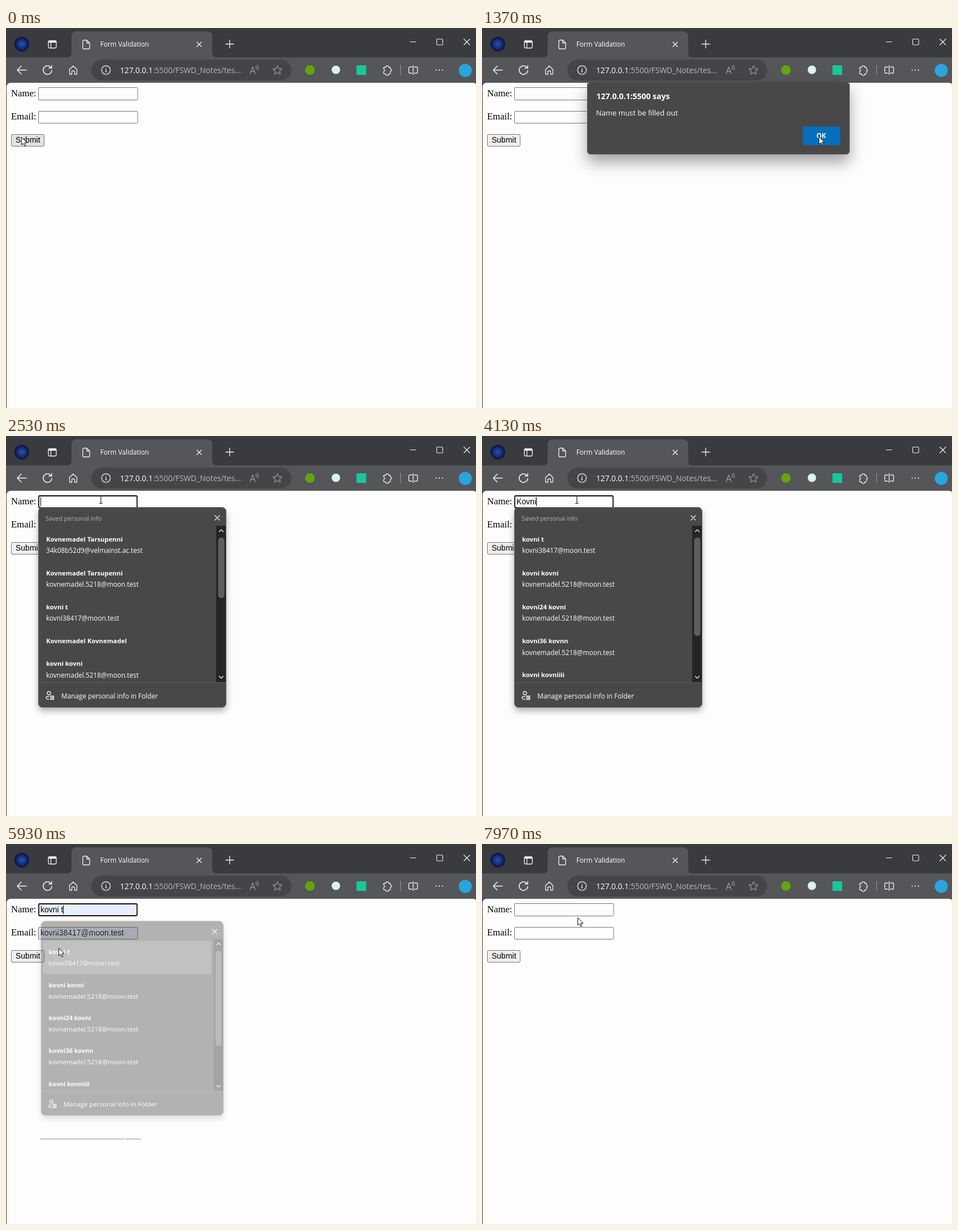
An HTML page for the animation above (8 s loop, 832x673 px).

```html
<!DOCTYPE html>
<html lang="en">
<head>
<meta charset="utf-8">
<title>Form Validation</title>
<style>
  html, body { margin: 0; width: 100%; height: 100%; overflow: hidden; background: #fdfdfb; }
  svg { display: block; width: 100%; height: 100%; }
  text { white-space: pre; }
  .ui { font-family: "Open Sans", "Noto Sans", sans-serif; fill: #fff; }
  .page { font: 16.7px "Liberation Serif", serif; fill: #000; }
  .field { font: 14px "Liberation Sans", sans-serif; fill: #000; }
  .bold { font-weight: 700; }
  .line { fill: none; stroke: #f2f2f2; stroke-width: 1.3; stroke-linecap: round; stroke-linejoin: round; }
  .dim { stroke: #96979a; }
  #dialog { filter: drop-shadow(0 14px 13px rgba(20, 10, 40, .38)); }
  #popup { filter: drop-shadow(0 6px 6px rgba(0, 0, 0, .3)); }
</style>
</head>
<body>
<svg viewBox="0 0 832 673">
  <defs>
    <radialGradient id="portrait">
      <stop offset="0" stop-color="#2858b0"/>
      <stop offset=".6" stop-color="#172c78"/>
      <stop offset="1" stop-color="#0c1238"/>
    </radialGradient>
  </defs>

  <!-- Browser frame -->
  <rect width="832" height="673" fill="#393b3e"/>
  <rect y="52" width="832" height="60" fill="#54565a"/>
  <path d="M108 52q8 0 8-8V15q0-9 9-9H356q9 0 9 9V44q0 8 8 8Z" fill="#54565a"/>
  <path d="M1 673V105q0-8 8-8H826q8 0 8 8V673Z" fill="#fdfdfb"/>
  <circle cx="28" cy="28.5" r="13" fill="url(#portrait)"/>
  <rect x="151" y="56" width="354" height="37" rx="18.5" fill="#434548"/>

  <g class="line">
    <rect x="75" y="22.5" width="14" height="13" rx="2.5"/>
    <path d="M75 24.5H89" stroke-width="3" stroke-linecap="butt"/><path d="M79.5 26V35"/>
    <path d="M143 21.5H138q-2 0-2 2V35q0 2 2 2H146q2 0 2-2V26.5ZM143 21.5V26.5H148"/>
    <path d="M338 25l8 8m0-8l-8 8M389 28.5h14M396 21.5v14"/>
    <path d="M715.5 24.5h10M810.5 19.5l10.5 10.5m0-10.5l-10.5 10.5" stroke-width="1.1"/>
    <rect x="762.5" y="19.5" width="10.5" height="10.5" rx="1.5" stroke-width="1.1"/>
    <path d="M36 74.5H20.5M27 67.5l-7 7 7 7" stroke-width="1.5"/>
    <path d="M79.5 70A7.6 7.6 0 1 0 81 75M80.8 66.5V71H76" stroke-width="1.5"/>
    <path d="M112.5 73.5L119 67.2l6.5 6.3V81q0 1-1 1H121.5V77q0-1-1-1h-3q-1 0-1 1v5H113.5q-1 0-1-1Z"/>
    <circle cx="177" cy="74.5" r="7.7"/><path d="M177 74V78M177 71v.1" stroke-width="1.6"/>
    <path d="M670 69.5h2.2a2.6 2.6 0 0 1 5.2 0H679q1.500 0 1.500 1.500V72.400a2.500 2.500 0 0 1 0 4.800V80q0 1.500-1.500 1.500H677.400a2.600 2.600 0 0 1-5.200 0H670q-1.500 0-1.500-1.500V77.200a2.500 2.500 0 0 0 0-4.800V71q0-1.500 1.500-1.500Z"/>
    <path d="M698.5 66V83" class="dim" stroke-width="1"/>
    <path d="M718.5 69H715q-2 0-2 2V78q0 2 2 2H718.5M723 69H726.5q2 0 2 2V78q0 2-2 2H723M720.7 66.5V82.5"/>
    <path d="M761.5 74.5h.1M767 74.5h.1M772.5 74.5h.1" stroke-width="2.2"/>
    <path class="dim" d="M480.5 66.8l2.4 5 5.5.7-4 3.8 1 5.5-4.9-2.7-4.9 2.7 1-5.5-4-3.8 5.5-.7Z"/>
    <path class="dim" d="M432 81l4.6-12 4.6 12M433.5 77h6.2M442 68q2 2 1.2 5M444.5 66q3 3 1.8 8"/>
  </g>
  <circle cx="538" cy="74.5" r="8.5" fill="#64a40e"/>
  <circle cx="584" cy="74" r="7.5" fill="#d9f2f3"/>
  <rect x="620.5" y="66" width="17" height="17" fill="#18c79c"/>
  <circle cx="813" cy="75" r="11.5" fill="#2aa4df"/>
  <text class="ui" x="167" y="33" font-size="11.7">Form Validation</text>
  <text class="ui" x="202" y="79.5" font-size="13.7">127.0.0.1<tspan fill="#b7b8ba">:5500/FSWD_Notes/tes...</tspan></text>

  <!-- Form -->
  <g class="page"><text x="9" y="120.5">Name:</text><text x="9" y="162">Email:</text></g>
  <rect id="nameBox"/>
  <rect id="emailBox" x="57.5" y="147.5" width="175.5" height="21" rx="1.5" stroke="#767676"/>
  <rect id="submit" x="9.5" y="188.5" width="58" height="21" rx="2.5" stroke="#767676"/>
  <g class="field">
    <text id="nameText" x="61" y="121"></text>
    <text id="emailText" x="61" y="162"></text>
    <text x="17" y="203">Submit</text>
  </g>
  <path id="caret" stroke="#000"/>
  <path id="remnant" d="M61 522.5H209M211 522.5H239" stroke="#c0c0c0" stroke-width="2"/>

  <g id="popup" class="ui">
    <rect x="57" y="126" width="333" height="355" rx="8" fill="#484848"/>
    <rect x="57.5" y="126.5" width="332" height="354" rx="8" fill="none" stroke="#606060"/>
    <text x="70" y="149.5" font-size="10.8" fill="#b4b4b4">Saved personal info</text>
    <path class="line" d="M370 141l8 8m0-8l-8 8"/>
    <rect id="hover" x="61" y="162" width="307" height="61" rx="3" fill="#6c6c6c"/>
    <g id="allRows"></g>
    <g id="matchRows"></g>
    <rect x="372" y="159" width="17" height="277" fill="#252525"/>
    <rect id="thumb" x="375.5" y="180" width="11" rx="5" fill="#5e5e5e"/>
    <path class="line" d="M377.5 169.5l3.5-3.5 3.5 3.5M377.5 425.5l3.5 3.5 3.5-3.5"/>
    <path d="M58 436.5H389" stroke="#5c5c5c"/>
    <g class="line">
      <circle cx="76" cy="455.5" r="3"/>
      <path d="M76 461.5H73q-2 0-2 2 1 3 5 3M79 460.5h5.5v6H79ZM81 462.5h2M81 464.5h2"/>
    </g>
    <text x="98" y="464.5" font-size="11.8">Manage personal info in Folder</text>
  </g>

  <g id="dialog" class="ui">
    <rect x="186" y="96" width="465" height="128" rx="7" fill="#484848"/>
    <path d="M186.5 97V217q0 6.5 6.5 6.5H644q6.5 0 6.5-6.5V97" fill="none" stroke="#626262"/>
    <text class="bold" x="202.5" y="125.5" font-size="14">127.0.0.1:5500 says</text>
    <text x="202" y="154.5" font-size="12.9">Name must be filled out</text>
    <rect x="568" y="174.5" width="66" height="33" rx="3" fill="#086fbd"/>
    <text class="bold" x="600.5" y="195" font-size="11.6" text-anchor="middle">OK</text>
  </g>

  <path id="arrow" d="M.5.5V14L3.7 11 5.8 16 8 15 5.9 10.3H10.2Z" fill="#fff" stroke="#111"/>
  <path id="beam" d="M-3-7.5h2l1 1 1-1h2M-3 6.5h2l1-1 1 1h2M0-6.5V5.5" fill="none" stroke="#222" stroke-width="1.2"/>
</svg>
<script>
const $ = id => document.getElementById(id);
const LOOP = 8000;
const LONG_MAIL = 'kovnemadel.5218@moon.test';
const SHORT_MAIL = 'kovni38417@moon.test';
const SHORT_NAME = 'kovni t';

const at = { opened: 100, closed: 1690, focus: 2500, list: 2515, hover: 5350, filled: 5830, hidden: 5860, sent: 7100 };
const typed = [[3350, 'K'], [3500, 'Ko'], [3650, 'Kov'], [3800, 'Kovn'], [3980, 'Kovni']];

// Pointer stops: time, x, y
const stops = [
  [0, 27, 193], [80, 27, 193], [470, 290, 225], [900, 596, 192], [1500, 596, 192],
  [1730, 365, 140], [2200, 168, 113], [4700, 168, 113], [5400, 93, 184], [5960, 93, 184],
  [6500, 30, 196], [7250, 30, 196], [7530, 58, 185], [7970, 169, 130], [8000, 169, 130]
];

function fillRows(id, people) {
  let y = 186.5;
  $(id).innerHTML = people.map(([name, mail]) => {
    const row = `<text class="bold" x="71" y="${y}" font-size="11.3">${name}</text>` +
      (mail ? `<text x="71" y="${y + 20.5}" font-size="11.8">${mail}</text>` : '');
    y += mail ? 60.2 : 40;
    return row;
  }).join('');
}
fillRows('allRows', [
  ['Kovnemadel Tarsupenni', '34k08b52d9@velmainst.ac.test'],
  ['Kovnemadel Tarsupenni', LONG_MAIL],
  [SHORT_NAME, SHORT_MAIL],
  ['Kovnemadel Kovnemadel'],
  ['kovni kovni', LONG_MAIL]
]);
fillRows('matchRows', [
  [SHORT_NAME, SHORT_MAIL],
  ['kovni kovni', LONG_MAIL],
  ['kovni24 kovni', LONG_MAIL],
  ['kovni36 kovnn', LONG_MAIL],
  ['kovni kovniiii']
]);

const clamp = v => Math.max(0, Math.min(1, v));
const progress = (t, start, length) => clamp((t - start) / length);
const within = (t, from, to) => t >= from && t < to;
const show = (id, on) => { $(id).style.display = on ? '' : 'none'; };
const set = (id, attrs) => { for (const key in attrs) $(id).setAttribute(key, attrs[key]); };
const scaleAbout = (x, y, s, dy = 0) => `translate(${x} ${y + dy}) scale(${s}) translate(${-x} ${-y})`;

function pointer(t) {
  const i = stops.findIndex(s => s[0] > t);
  const [t0, x0, y0] = stops[i - 1], [t1, x1, y1] = stops[i];
  const p = (t - t0) / (t1 - t0), e = p * p * (3 - 2 * p);
  return [x0 + (x1 - x0) * e, y0 + (y1 - y0) * e];
}

function drawForm(t, x, y) {
  const focused = within(t, at.focus, at.sent);
  const autofilled = within(t, at.hover, at.sent);
  const keys = typed.filter(([time]) => time <= t).pop();
  const name = !focused ? '' : autofilled ? SHORT_NAME : keys ? keys[1] : '';
  const fill = autofilled ? '#e8f0fe' : '#fdfdfb';
  set('nameBox', focused
    ? { x: 58, y: 106, width: 174, height: 21, rx: 1.5, stroke: '#101010', 'stroke-width': 1.8, fill }
    : { x: 57.5, y: 105.5, width: 175.5, height: 22, rx: 1.5, stroke: '#767676', 'stroke-width': 1, fill });
  set('emailBox', { fill });
  $('nameText').textContent = name;
  $('emailText').textContent = autofilled ? SHORT_MAIL : '';

  const lastEdit = t >= at.filled ? at.filled : keys ? keys[0] : at.focus;
  show('caret', focused && (t - lastEdit) % 1060 < 530);
  const caretX = Math.round(61 + (name ? $('nameText').getComputedTextLength() : 0)) + .5;
  set('caret', { d: `M${caretX} 108.5V124` });

  const overSubmit = x > 9 && x < 68 && y > 188 && y < 210;
  set('submit', { fill: overSubmit ? '#e2e2e2' : '#efefef' });
}

function drawPopup(t) {
  const out = progress(t, at.hidden, 120);
  const matching = t >= typed[4][0];
  show('popup', t >= at.list && out < 1);
  $('popup').style.opacity = 1 - out;
  set('popup', { transform: scaleAbout(223.5, 481, 1 - .05 * out) });
  show('allRows', !matching);
  show('matchRows', matching);
  show('hover', t >= at.hover);
  set('thumb', { height: matching ? 174 : 107 });
  show('remnant', within(t, 5800, 6010));
}

function drawDialog(t) {
  const away = 1 - progress(t, at.opened, 130) + progress(t, at.closed, 120);
  show('dialog', away < 1);
  $('dialog').style.opacity = 1 - away;
  set('dialog', { transform: scaleAbout(418.5, 160, 1 + .03 * away, -36 * away) });
}

function draw(t) {
  const [x, y] = pointer(t);
  drawForm(t, x, y);
  drawPopup(t);
  drawDialog(t);

  const listOpen = within(t, at.list, at.hidden);
  const dialogOpen = within(t, at.opened, at.closed + 120);
  const overField = x > 57 && x < 233 && !dialogOpen &&
    ((y > 105 && y < 127) || (!listOpen && y > 147 && y < 169));
  show('arrow', !overField);
  show('beam', overField);
  set(overField ? 'beam' : 'arrow', { transform: `translate(${Math.round(x)} ${Math.round(y)})` });
}

const start = performance.now();
function tick() {
  draw((performance.now() - start) % LOOP);
  requestAnimationFrame(tick);
}
tick();
</script>
</body>
</html>
```
